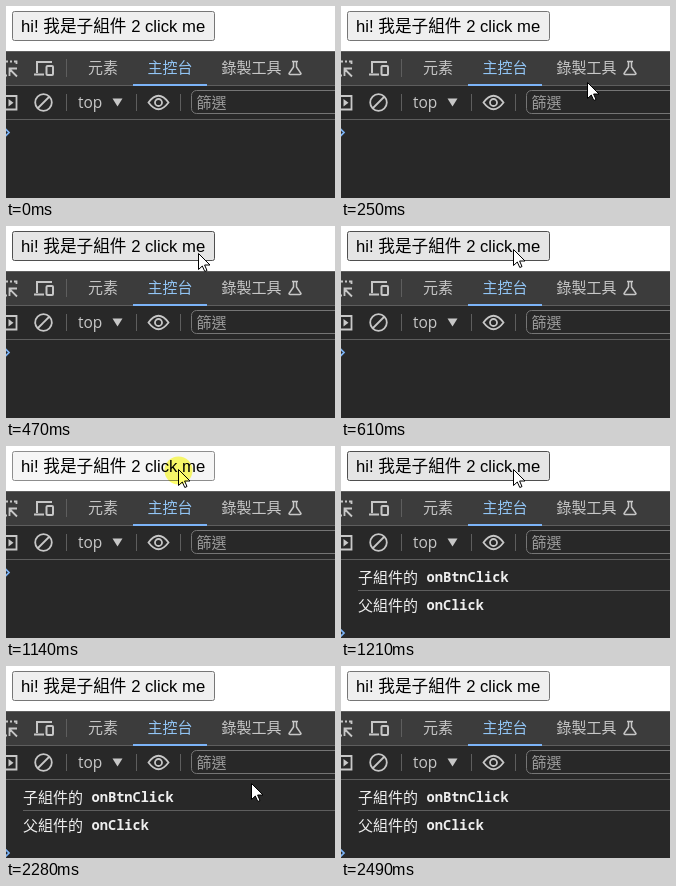
Write an HTML page that moves like this. It is 329 px wide and 192 px high and loops after 4030 ms.

```html
<!DOCTYPE html>
<html lang="zh-Hant">
<head>
<meta charset="utf-8">
<title>Console click</title>
<style>
html, body { margin: 0; width: 100%; height: 100%; overflow: hidden; background: #fff; }
svg { display: block; }
text { font: 15px "Noto Sans CJK TC", "Noto Sans CJK", sans-serif; fill: #c7c7c7; white-space: pre; }
.label { font: 300 16.67px "Liberation Sans", "Noto Sans CJK TC", "Noto Sans CJK", sans-serif; fill: #000; }
.log text { fill: #eee; }
.log .code { font: 600 13.7px "Noto Sans Mono", monospace; }
.icon { fill: none; stroke: #c7c7c7; stroke-width: 1.8; }
.rule { stroke: #5e5e5e; }
</style>
</head>
<body>
<svg width="329" height="192" viewBox="0 0 329 192">
  <rect width="329" height="192" fill="#fff"/>
  <rect id="button" x="6.5" y="5.5" width="202" height="29" rx="2"/>
  <text class="label" x="15" y="25.5">hi! 我是子組件 2 click me</text>

  <rect y="45" width="329" height="147" fill="#282828"/>
  <rect y="45" width="329" height="35" fill="#3c3c3c"/>
  <path class="rule" d="M0 45.5H329M0 79.5H329M0 113.5H329M60.5 53V71M60.5 88V105M130.5 88V105M174.5 88V105"/>
  <rect x="127" y="78" width="74" height="2" fill="#7cb4f8"/>

  <!-- tab bar -->
  <g class="icon">
    <path d="M0 55.5H2M4 55.5H6M8 55.5H10.5V58M0 69.5H1M11 70.5L4 63.5M3.5 70V62.5H11"/>
    <path d="M31 67V56H46M28 68.5H38" stroke-width="2"/>
    <rect x="40.5" y="60" width="6.5" height="9" rx="1" stroke-width="2"/>
    <path d="M286 55.5H292M287.5 56V61L283 67.5Q283 68.500 284 68.5H294Q295 68.5 295 67.5L290.5 61V56" stroke-width="1.5"/>
  </g>
  <text x="82" y="67">元素</text>
  <text x="141.5" y="67" style="fill:#92c5f5">主控台</text>
  <text x="215.5" y="67">錄製工具</text>

  <!-- console toolbar -->
  <g class="icon">
    <path d="M0 90H10.5V103.5H0"/>
    <path d="M2.5 93L7.5 96.750L2.5 100.5Z" fill="#c7c7c7" stroke="none"/>
    <circle cx="37.5" cy="96.5" r="8.3"/>
    <path d="M31.5 102.5L43.5 90.5"/>
    <path d="M142.5 96.5Q152.5 83 162.5 96.5Q152.5 110 142.5 96.5Z"/>
    <circle cx="152.5" cy="96.5" r="3.5"/>
  </g>
  <text x="72" y="102" style="font:15.5px 'Open Sans',sans-serif">top</text>
  <path d="M106.500 92.500H116.500L111.500 100.500Z" fill="#c7c7c7"/>
  <rect x="185.5" y="84.500" width="160" height="23" rx="5" fill="none" stroke="#757575"/>
  <text x="190.5" y="101.5" style="fill:#9a9a9a">篩選</text>

  <g id="log" class="log">
    <text x="17" y="136.5">子組件的</text><text class="code" x="85.5" y="136">onBtnClick</text>
    <path class="rule" d="M17 144.5H329"/>
    <text x="17" y="164.5">父組件的</text><text class="code" x="85.5" y="164">onClick</text>
  </g>
  <path id="prompt" d="M-1 -4L3 0L-1 4" fill="none" stroke="#7cb4f8" stroke-width="1.7"/>

  <path id="cursor" d="M.5 .5V16.5L4.300 13L6.8 18.500L9 17.500L6.6 12H12Z" fill="#fff" stroke="#000"/>
  <circle id="press" cx="172.5" cy="24.5" r="14" fill="#ffff6c" style="mix-blend-mode:multiply"/>
</svg>
<script>
const LOOP = 4030;
const get = id => document.getElementById(id);
const [button, log, prompt_, cursor, press] =
  ["button", "log", "prompt", "cursor", "press"].map(get);

// button fill and border
const NORMAL = ["#efefef", "#767676"];
const HOVER = ["#e5e5e5", "#4f4f4f"];
const ACTIVE = ["#f5f5f5", "#8d8d8d"];

// time, x, y of the pointer; each position holds until the next
const path = [
  [250, 246, 76], [330, 229, 52], [400, 209, 33], [470, 192, 27], [540, 180, 24], [610, 172, 23],
  [2140, 192, 55], [2210, 218, 85], [2280, 245, 117], [2350, 275, 150], [2420, 302, 178]
];
const show = (el, on) => el.setAttribute("visibility", on ? "visible" : "hidden");
const move = (el, x, y) => el.setAttribute("transform", `translate(${x} ${y})`);

function draw(t) {
  const pressed = t >= 1140 && t < 1210;
  const hover = t >= 470 && t < 2140;
  const logged = t >= 1210;
  const spot = path.filter(p => p[0] <= t).pop();
  const [fill, stroke] = pressed ? ACTIVE : hover ? HOVER : NORMAL;

  button.setAttribute("fill", fill);
  button.setAttribute("stroke", stroke);
  show(press, pressed);
  show(log, logged);
  move(prompt_, 0, logged ? 187 : 126.5);
  show(cursor, spot && t < 2490);
  if (spot) move(cursor, spot[1], spot[2]);
}

const start = performance.now();
function tick() {
  draw((performance.now() - start) % LOOP);
  requestAnimationFrame(tick);
}
tick();
</script>
</body>
</html>
```
